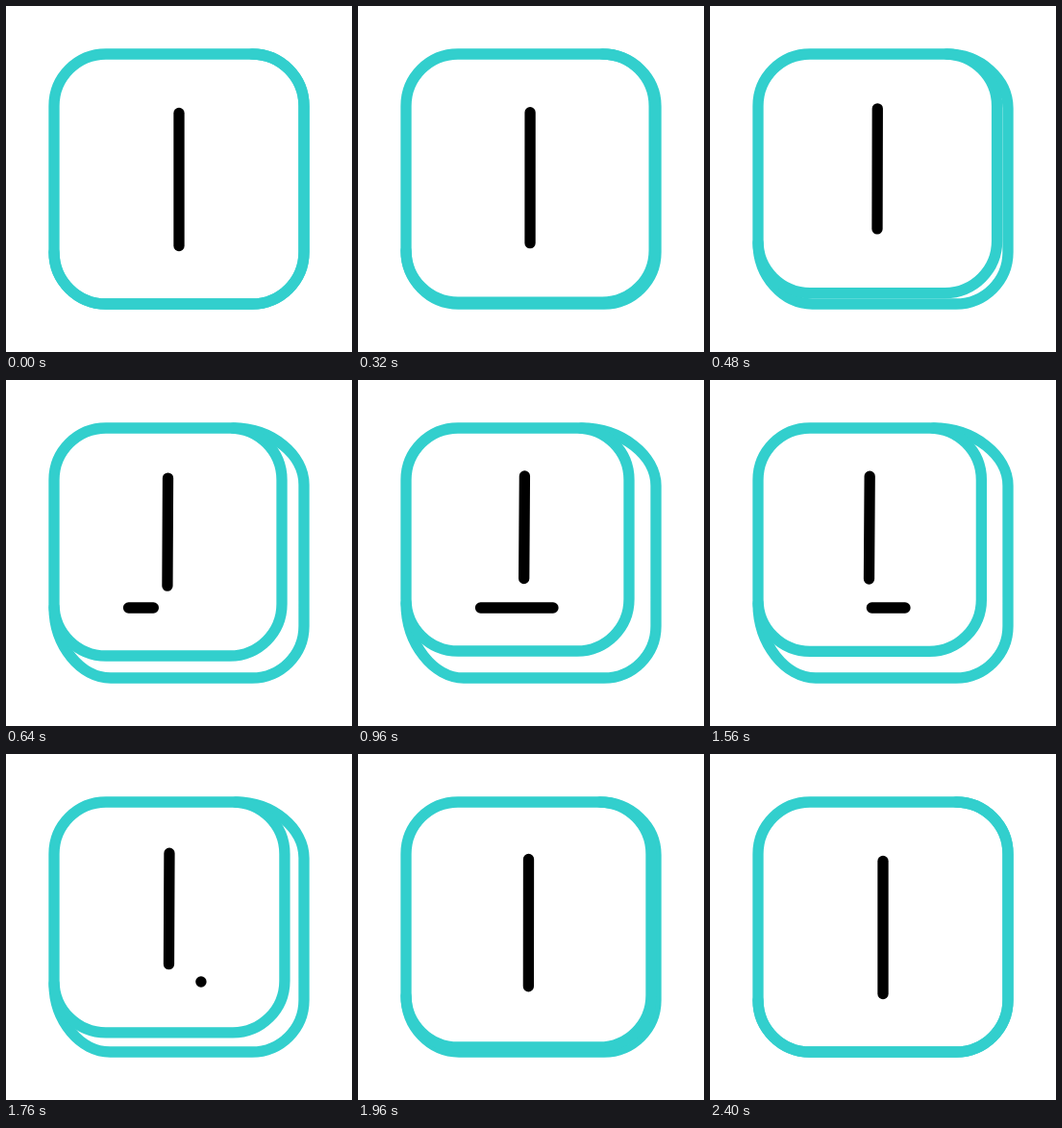
Recreate the animation shown at these times as an HTML page. Size 360 by 360 pixels, loop 2480 ms.

```html
<!DOCTYPE html>
<html lang="en">
<head>
<meta charset="utf-8">
<title>Stacked card</title>
<style>
  html, body { margin: 0; width: 100%; height: 100%; overflow: hidden; background: #fff; }
  svg { display: block; width: 100vw; height: 100vh; }
  path { fill: none; stroke-width: 11.3; stroke-linecap: round; stroke-linejoin: round; }
  .card { stroke: #32cfcd; }
  .ink { stroke: #000; }
</style>
</head>
<body>
<svg viewBox="0 0 360 360">
  <path id="back" class="card"/>
  <path id="front" class="card"/>
  <path id="bar" class="ink"/>
  <path id="base" class="ink"/>
</svg>
<script>
const LOOP = 2480, STEP = 40;
const NEAR = 50, FAR = 310, FOLD = 28, R = 54;
const BASE = { from: 127.5, to: 203, y: 237 };

const el = id => document.getElementById(id);
const back = el('back'), front = el('front'), bar = el('bar'), base = el('base');

const mix = (a, b, k) => a + (b - a) * k;
const clamp = x => Math.min(1, Math.max(0, x));

// Cubic bezier easing (a,0,b,1), solved by bisection
function ease(x, a = 0.535, b = 0.29) {
  if (x <= 0 || x >= 1) return clamp(x);
  let lo = 0, hi = 1, s;
  for (let i = 0; i < 24; i++) {
    s = (lo + hi) / 2;
    const px = 3 * (1 - s) ** 2 * s * a + 3 * (1 - s) * s * s * b + s ** 3;
    if (px < x) lo = s; else hi = s;
  }
  return s * s * (3 - 2 * s);
}

const phase = (t, start, length) => ease(clamp((t - start) / length));

function drawCards(open) {
  const e = FAR - FOLD * open;
  const c = 0.5523 * R, near = NEAR + R;
  front.setAttribute('d',
    `M${near} ${NEAR}H${e - R}A${R} ${R} 0 0 1 ${e} ${near}V${e - R}` +
    `A${R} ${R} 0 0 1 ${e - R} ${e}H${near}A${R} ${R} 0 0 1 ${NEAR} ${e - R}V${near}` +
    `A${R} ${R} 0 0 1 ${near} ${NEAR}Z`);

  // The rear edge grows out of the front card's straight sides
  const start = mix(FAR - R, 232, open);
  const lead = mix(FAR - R + c, 275, open);
  const tail = mix(near - c, 79, open);
  const end = mix(near, 110, open);
  back.setAttribute('d',
    `M${start} ${NEAR}C${lead} ${NEAR} ${FAR} ${tail} ${FAR} ${end}V${FAR - R}` +
    `A${R} ${R} 0 0 1 ${FAR - R} ${FAR}H${end}` +
    `C${tail} ${FAR} ${NEAR} ${lead} ${NEAR} ${start}`);
}

function drawInk(t, open) {
  const sway = 8 * Math.sin(2 * Math.PI * clamp((t - 840) / 640));
  const x = mix(180, 166, open) + sway;
  bar.setAttribute('d',
    `M${x} ${mix(111.5, 100, open)}L${x - 0.7 * open} ${mix(249.5, 206.5, open)}`);

  const drawn = phase(t, 490, 400), erased = phase(t, 1380, 400);
  const left = mix(BASE.from, BASE.to, erased), right = mix(BASE.from, BASE.to, drawn);
  base.setAttribute('d', right > left ? `M${left} ${BASE.y}H${right}` : '');
}

function render(ms) {
  const t = Math.floor((ms % LOOP) / STEP) * STEP;
  const open = phase(t, 160, 800) - phase(t, 1480, 800);
  drawCards(open);
  drawInk(t, open);
}

const began = performance.now();
function tick() {
  render(performance.now() - began);
  requestAnimationFrame(tick);
}
tick();
</script>
</body>
</html>
```
